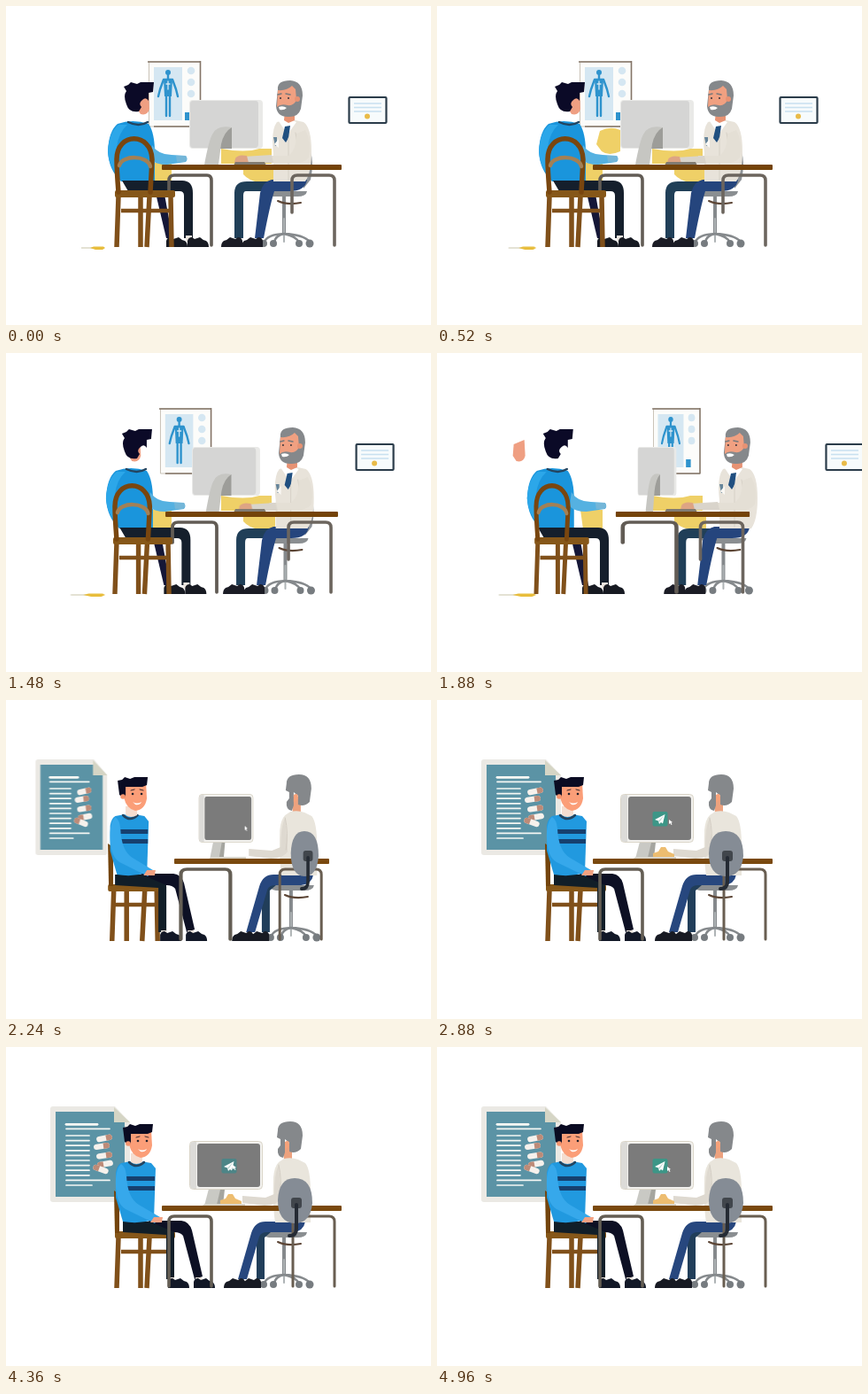
Recreate the animation shown at these times as an HTML page. Size 480 by 360 pixels, loop 5 s.

```html
<!DOCTYPE html>
<html lang="en">
<head>
<meta charset="utf-8">
<title>Consultation</title>
<style>
@property --k { syntax: "<number>"; inherits: true; initial-value: 0; }
html, body { margin: 0; width: 100%; height: 100%; overflow: hidden; background: #fff; }
svg { display: block; width: 480px; height: 360px; animation: orbit 5s infinite; }
svg * { animation-duration: 5s; animation-iteration-count: infinite; }

/* --k is the camera turn: 0 at rest, 1 at the cut between the two views */
@keyframes orbit {
  0% { --k: 0; }
  24.4% { --k: 0; animation-timing-function: cubic-bezier(.333, 0, .667, .333); }
  38% { --k: 1; animation-timing-function: cubic-bezier(.333, .667, .667, 1); }
  54%, 100% { --k: 0; }
}
.m {
  --x: 0px; --s: 0;
  transform-box: fill-box; transform-origin: center;
  transform: translateX(calc(var(--k) * var(--x))) scaleX(calc(1 + var(--k) * var(--s)));
}
.front { animation-name: front; animation-timing-function: step-end; }
.back { animation-name: back; animation-timing-function: step-end; }
@keyframes front { 0% { opacity: 1; } 38%, 100% { opacity: 0; } }
@keyframes back { 0% { opacity: 0; } 38%, 100% { opacity: 1; } }
.dash { transform-origin: 112px 273px; animation-name: dash; animation-timing-function: linear; }
@keyframes dash { to { transform: scaleX(2.5); } }
.glow { animation-name: glow; animation-timing-function: step-end; }
@keyframes glow { 0% { opacity: 0; } 6% { opacity: 1; } 24%, 100% { opacity: 0; } }
.typing { animation: typing .48s infinite alternate ease-in-out !important; }
@keyframes typing { to { transform: translate(2px, 1px); } }
.icon { animation-name: icon; animation-timing-function: step-end; }
@keyframes icon { 0% { opacity: 0; } 48%, 100% { opacity: 1; } }
.cursor { animation-name: cursor; animation-timing-function: ease-in-out; }
@keyframes cursor {
  0%, 46% { transform: translate(277px, 142px); }
  56%, 64% { transform: translate(262px, 135px); }
  72%, 88% { transform: translate(256px, 133px); }
  98%, 100% { transform: translate(260px, 135px); }
}
.press { animation-name: press; animation-timing-function: step-end; }
@keyframes press { 0% { fill: #3d9687; } 84% { fill: #4d8587; } 90%, 100% { fill: #3d9687; } }
.mouse { animation-name: mouse; animation-timing-function: ease-in-out; }
@keyframes mouse { 0%, 64% { transform: none; } 72%, 88% { transform: translateX(-2px); } 98%, 100% { transform: none; } }
.line { fill: none; stroke-linecap: round; stroke-linejoin: round; }
.wood { fill: none; stroke: #80501a; stroke-width: 5.5; }
</style>
</head>
<body>
<svg viewBox="0 0 480 360">
<defs>
  <path id="shoe" d="M0 272V265Q1 261 5 261L8 263L14 261Q17 264 21 265Q24 267 24 272Z"/>
  <g id="base" class="line" stroke="#85898c">
    <path d="M314 215V257" stroke-width="4"/>
    <path d="M314 240V266" stroke="#aeb3b5" stroke-width="2"/>
    <path d="M292 266Q295 258 314 257Q336 258 343 266M314 257Q304 259 303 267M314 257Q328 260 331 267" stroke-width="2.5"/>
    <g fill="#777c80" stroke="none">
      <circle cx="291" cy="268" r="4"/><circle cx="302" cy="268" r="4"/>
      <circle cx="331" cy="268" r="4"/><circle cx="343" cy="268" r="4.5"/>
    </g>
    <path d="M289 209H340Q339 215 329 215H297Q290 214 289 209Z" fill="#8a8e91" stroke="none"/>
    <path d="M307 220Q318 225 333 222" stroke="#5c4535" stroke-width="2"/>
  </g>
  <path id="nearLegs" class="wood" d="M127 215L125 272M162 215L159 272"/>
  <path id="farLegs" class="wood" d="M152 215V272M186 215L187 272"/>
  <g id="seat">
    <path class="wood" d="M130 231H187" style="stroke-width:4.5px"/>
    <rect x="123" y="208" width="68" height="8" rx="2" fill="#865719"/>
  </g>
  <g id="pill">
    <rect x="-9" y="-3.2" width="18" height="6.400" rx="3.2" fill="#f6f1ec"/>
    <path d="M2 -3.200H5.800a3.200 3.200 0 0 1 0 6.400H2Z" fill="#bd8b78"/>
  </g>
</defs>

<g class="front">
  <g class="dash" fill="#e8bd3c">
    <path d="M85 273H100" stroke="#c9c4a8"/>
    <path d="M95 273L99 271.5H110L112 273L109 275H101Z"/>
  </g>

  <g class="m" style="--x:85px;--s:-.1">
    <path d="M161.5 63V136H219.5V63Z" fill="#fcfcfa" stroke="#c9c2b7"/>
    <path d="M160 63H220M167 136H220M219.5 62V136" stroke="#837467" stroke-width="1.6"/>
    <path d="M167 69H199V129H167Z" fill="#d5e7f2"/>
    <g fill="#d5e7f2"><circle cx="209" cy="73" r="4.3"/><circle cx="209" cy="86" r="4.3"/><circle cx="209" cy="99" r="4.3"/></g>
    <path d="M202 120H208V129H202Z" fill="#2e93cd"/>
    <circle cx="183" cy="75" r="3" fill="#2e93cd"/>
    <path class="line" d="M183 78V100M178 83H188M178 83L174 94L172 102M188 83L192 94L194 102M181 101L181 113V124M185 101L185 113V124" stroke="#2e93cd" stroke-width="2.4"/>
    <path d="M178 82H188L187 102H179Z" fill="#2e93cd"/>
    <path class="line" d="M183 85V94M181 88H185" stroke="#d5e7f2" stroke-width="1.3"/>
  </g>

  <g class="m" style="--x:55px">
    <rect x="387.5" y="103" width="42" height="29" rx="1" fill="#f7fbfc" stroke="#2b3c4a" stroke-width="2.2"/>
    <path d="M393 110H424M393 114.5H424M393 119H424" stroke="#c8e0ef" stroke-width="1.6"/>
    <circle cx="408" cy="124.5" r="3" fill="#e9bb48"/>
  </g>

  <g fill="#efd067">
    <path d="M162 177H187V199H165ZM243 161Q270 166 286 161H300V178H243ZM268 184H304V199H286Q274 197 268 190Z"/>
    <path class="glow" d="M184 141Q196 135 207 140V164Q194 170 186 164L180 156Z"/>
  </g>

  <g class="m" style="--x:10px">
    <path d="M338 164H344Q348 178 344 196L336 206Z" fill="#8d9297"/>
    <use href="#base"/>
  </g>
  <g class="m" style="--x:14px">
    <path d="M258 262V211Q258 198 272 198H306V209H271Q268 209 268 214V262Z" fill="#203f58"/>
    <path d="M300 196H340Q338 209 320 209H303Q298 225 291 262H281L287 211Q290 198 300 196Z" fill="#25457d"/>
    <g fill="#1b1c25"><use href="#shoe" transform="translate(267 0) scale(-1 1)"/><use href="#shoe" transform="translate(290 0) scale(-1 1)"/></g>
  </g>
  <g class="m" style="--x:18px">
    <path d="M306 131Q320 126 336 131Q345 137 345 164Q345 188 338 198H302V166Q299 140 306 131Z" fill="#e8e3da"/>
    <path d="M308 130L319 127L328 131L318 145Z" fill="#fff"/>
    <path d="M315 136L321 135L319 149L316 154L312 149Z" fill="#204f80"/>
    <path class="line" d="M319 149V196M327 143Q331 160 326 171" stroke="#d6d0c6"/>
    <path d="M302 148H306V158H304Z" fill="#66859a"/>
    <path d="M303 156L308 160V150Z" fill="#faf8f4"/>
    <path d="M338 140Q346 154 342 171Q336 178 325 177H295V169H319Q328 163 328 144Z" fill="#e4dfd5"/>
    <g class="typing">
      <path d="M300 168L268 170V177H302Z" fill="#d9d4cb"/>
      <path d="M272 169Q262 167 259 172L258 177H274Z" fill="#dda484"/>
    </g>
  </g>
  <g class="m" style="--x:20px">
    <path d="M315 118H326V129L319 132L314 129Z" fill="#e79273"/>
    <path d="M307 94Q306 84 321 84Q335 85 335 101L333 116Q330 126 318 125Q306 125 305 113Z" fill="#85888b"/>
    <path d="M307 95Q317 96 323 90L327 94L328 106Q325 113 318 112Q310 110 306 114Z" fill="#f0a081"/>
    <circle cx="329" cy="105" r="3" fill="#e79273"/>
    <path d="M308 114Q313 112 317 115Q314 118 309 117Z" fill="#fff"/>
    <g fill="#35313a"><circle cx="310" cy="104" r="1"/><circle cx="319" cy="104" r="1"/></g>
    <path class="line" d="M307 100L311 99M316 99L321 100" stroke="#77797c" stroke-width="1.5"/>
  </g>

  <g class="m" style="--s:-.5">
    <rect x="207" y="106" width="83" height="55" rx="4" fill="#e9e9e7"/>
    <path d="M211 107H282Q285 107 285 111V156Q285 160 281 160H211Q208 160 208 156V111Q208 107 211 107Z" fill="#d5d5d4"/>
    <path d="M244 139L255 137V161H241Z" fill="#9d9d99"/>
    <path d="M224 179Q229 152 233 145Q238 134 255 137Q246 142 243 156L240 179Z" fill="#c6c6c2"/>
  </g>
  <path d="M259 176H292L294 180H257Z" fill="#817b72"/>

  <g class="m" style="--x:-14px">
    <path d="M126 133Q143 127 161 133Q168 143 168 166L168 198H130Q116 185 115 164Q116 141 126 133Z" fill="#1a95dc"/>
    <path d="M127 134Q116 143 115 164Q116 180 125 190V160Q127 143 137 134Z" fill="#2ca7e9"/>
    <path d="M138 131Q150 137 160 131" class="line" stroke="#24445f" stroke-width="2.5"/>
    <path d="M165 157Q172 168 187 168L203 169Q206 173 203 176L182 179Q169 179 163 173Z" fill="#55b1e1"/>
    <path d="M192 169L203 169Q206 173 202 176H193Z" fill="#74b6d8"/>
  </g>
  <g class="m" style="--x:-66px">
    <path d="M149 103L161 98L162 116Q160 124 152 122L148 116Z" fill="#ef9f82"/>
  </g>
  <g class="m" style="--x:-14px">
    <path d="M133 91L138 89L141 86L148 88L152 86H167L166 97L161 98V107Q158 102 154 106Q149 110 153 114L150 119Q139 121 136 111Q132 101 136 96Z" fill="#0b0a27"/>
  </g>
  <g class="m" style="--x:-18px">
    <path d="M168 207H178L188 262H181Z" fill="#151737"/>
    <path d="M131 197H199Q211 197 211 211V262H201V214Q201 209 196 209H138Z" fill="#151f2c"/>
    <path d="M203 259H210V266H203Z" fill="#ece6df"/>
    <g fill="#171a22"><use href="#shoe" x="181"/><use href="#shoe" x="205"/></g>
  </g>

  <g class="m" style="--x:34px;--s:.28">
    <path class="line" d="M184 214V197Q184 191 190 191H227Q232 191 232 197V270" stroke="#625c55" stroke-width="3.6"/>
  </g>
  <g class="m" style="--x:-27px">
    <path class="line" d="M323 233V197Q323 191 329 191H365Q371 191 371 197V270" stroke="#6c655e" stroke-width="3.6"/>
  </g>
  <rect class="m" style="--s:-.27" x="176" y="179" width="203" height="6" rx="1" fill="#744309"/>
  <g class="m" style="--x:-17px;--s:-.1">
    <use href="#nearLegs"/><use href="#farLegs"/><use href="#seat"/>
    <path class="line" d="M127 210Q125 185 125 173C125 142 164 142 165 173L163 210" stroke="#79460f" stroke-width="5.5"/>
    <path class="line" d="M128 180C131 168 160 168 163 181" stroke="#a38055" stroke-width="4.5"/>
  </g>
</g>

<g class="back">
  <g class="m" style="--x:-64px;--s:-.3">
    <path d="M53 67H123L140 85V172Q140 175 137 175H53Q50 175 50 172V70Q50 67 53 67Z" fill="#ebe9e4"/>
    <path d="M56 73H122V85H134V169H56Z" fill="#5b93a5"/>
    <path d="M122 68V85H140Z" fill="#d5d5c5"/>
    <g class="line" stroke="#f5f7f4" stroke-width="1.7">
      <path d="M68 87.300H103" stroke-width="2.800"/>
      <path d="M68 92.300H117M68 100H94M68 105.600H94M68 111.200H94M68 116.800H94M68 122.400H94M68 128H94M68 133.600H94M68 139.200H94M68 144.800H94M68 150.400H117M68 156H97"/>
    </g>
    <use href="#pill" transform="translate(111 103) rotate(-12)"/>
    <use href="#pill" transform="translate(108 112) rotate(-8)"/>
    <use href="#pill" transform="translate(111 122.500) rotate(-8)"/>
    <use href="#pill" transform="translate(112 132) rotate(-10) scale(-1 1)"/>
    <use href="#pill" transform="translate(107 138) rotate(20) scale(-1 1)"/>
  </g>

  <g class="m" style="--x:-48px"><use href="#farLegs"/></g>
  <g class="m" style="--x:-16px"><use href="#nearLegs"/></g>
  <g class="m" style="--x:-36px;--s:-.36"><use href="#seat"/></g>
  <path class="m" style="--x:-21px" d="M122 162L128 166V210H123Z" fill="#74450d"/>

  <g class="m" style="--x:-27px">
    <path d="M132 197H178Q190 198 190 211V262H181V212L132 209Z" fill="#111e28"/>
    <path d="M160 196H198Q207 197 210 207L222 259L213 262L200 213Q197 209 190 209Z" fill="#0d1024"/>
    <path d="M184 260H190V265H184ZM214 260H221V266H214Z" fill="#e9e2da"/>
    <g fill="#121827"><use href="#shoe" x="183"/><use href="#shoe" x="212"/></g>
  </g>
  <g class="m" style="--x:-22px;--s:-.1">
    <path d="M130 131Q147 127 164 131L169 137L167 195Q150 200 132 197L124 170V142Q125 134 130 131Z" fill="#2199df"/>
    <path d="M131 146H168V151H131ZM131 157H168V162H131Z" fill="#16406f"/>
    <path class="line" d="M139 130Q147 138 156 130" stroke="#24445f" stroke-width="2.5"/>
    <path d="M130 132Q123 138 124 158Q125 177 135 183L168 199L174 192L150 178Q137 170 136 145Q135 135 130 132Z" fill="#36a8eb"/>
    <path d="M167 192L177 192L176 198H163Z" fill="#f2a182"/>
  </g>
  <g class="m" style="--x:-18px">
    <path d="M141 120H154V130Q147 134 141 130Z" fill="#f4ddd0"/>
    <path d="M138 97L164 94L165 111Q163 124 152 125Q142 123 139 110Z" fill="#fb9e78"/>
    <path d="M132 91L137 90L140 87L146 89L151 87H166L165 96L160 98H141V108L139 111L134 107Z" fill="#0a0b22"/>
    <circle cx="138" cy="109" r="2.800" fill="#f5946d"/>
    <g fill="#24222c"><circle cx="149" cy="106" r="1.3"/><circle cx="159" cy="106" r="1.3"/></g>
    <path class="line" d="M147 102L151 101M157 101L161 102" stroke="#372a30"/>
    <path d="M149 115Q154 118 159 115Q157 119 152 118Z" fill="#fff"/>
  </g>

  <g class="m" style="--s:-.78">
    <path d="M229 160H244L241 179H224Z" fill="#c9c9c4"/>
    <path d="M242 161H247L245 178H238Z" fill="#a5a59f"/>
    <rect x="207.5" y="106.5" width="82" height="54" rx="4" fill="#f2f1ee" stroke="#dad5c8"/>
    <path d="M212 107Q208 107 208 111V156Q208 160 212 160H215V107Z" fill="#dcdbd8"/>
    <rect x="216" y="109" width="71" height="49" rx="3" fill="#7b7b7b"/>
    <g class="icon">
      <rect class="press" x="243.5" y="126" width="17" height="16.5" rx="2" fill="#3d9687"/>
      <path d="M257.5 129L246 135L250 136.5L251 140L253 138L255 139.5Z" fill="#fff"/>
      <path d="M250 136.5L257 129.5L251 138Z" fill="#b9d5d0"/>
    </g>
    <path class="cursor" d="M0 0L4 3L2.5 3.5L3.5 5.5L2.5 6L1.5 4L0 5Z" fill="#fff"/>
  </g>

  <g class="m" style="--x:24px"><use href="#base"/></g>
  <path class="m" style="--x:18px" d="M283 262V210Q285 199 298 198H325V209H299L292 215V262Z" fill="#213e5a"/>
  <g class="m" style="--x:28px">
    <path d="M338 197H293Q281 197 277 210L262 262H272L286 214Q288 209 295 209H324Q336 208 338 197Z" fill="#27477e"/>
    <g fill="#171a23"><use href="#shoe" transform="translate(270 0) scale(-1 1)"/><use href="#shoe" transform="translate(288 0) scale(-1 1)"/></g>
  </g>
  <g class="m" style="--x:30px">
    <path d="M313 109H323V129H314Z" fill="#eda27e"/>
    <path d="M307 94Q307 84 321 84Q335 84 335 100L333 115Q327 121 320 118V108L315 104V119L313 125Q306 124 307 115L310 111V104L306 102Z" fill="#85888b"/>
    <path d="M315 107Q320 104 320 110Q319 115 315 115Z" fill="#f6a27a"/>
  </g>
  <g class="m" style="--x:22px">
    <path d="M308 130L314 126Q322 124 330 127L338 131Q344 138 344 165V198H304Q301 180 302 147Q303 135 308 130Z" fill="#e9e5dc"/>
    <path d="M308 133Q303 142 303 166L293 170L267 168V176L292 179Q307 178 311 171Z" fill="#ded9d0"/>
    <path class="line" d="M308 133Q312 150 309 169" stroke="#d3cdc3"/>
  </g>
  <g class="icon">
    <path class="mouse" d="M244 173L250 171L253 166H258L261 171L268 174V177H244Z" fill="#edbd70"/>
  </g>

  <g class="m" style="--x:53px;--s:.5">
    <path class="line" d="M184 270V197Q184 191 190 191H227Q232 191 232 197V270" stroke="#645e54" stroke-width="3.6"/>
  </g>
  <g class="m" style="--x:-45px">
    <path class="line" d="M324 270V197Q324 191 330 191H365Q371 191 371 197V270" stroke="#695e51" stroke-width="3"/>
  </g>
  <g class="m" style="--s:-.42">
    <rect x="176" y="179" width="203" height="6" rx="1" fill="#7a490e"/>
    <path d="M224 177H270V179H222Z" fill="#d8d4ca"/>
  </g>
  <path class="m" style="--x:33px;--s:-.6" d="M326 148Q346 148 346 176Q344 199 326 199Q307 198 307 173Q308 148 326 148Z" fill="#858c95"/>
  <g class="m" style="--x:40px;--s:-.3">
    <rect x="322" y="170" width="12" height="12" rx="3" fill="#41464c"/>
    <path class="line" d="M328 178V205Q328 213 320 213" stroke="#252b34" stroke-width="4"/>
  </g>
</g>
</svg>
</body>
</html>
```
